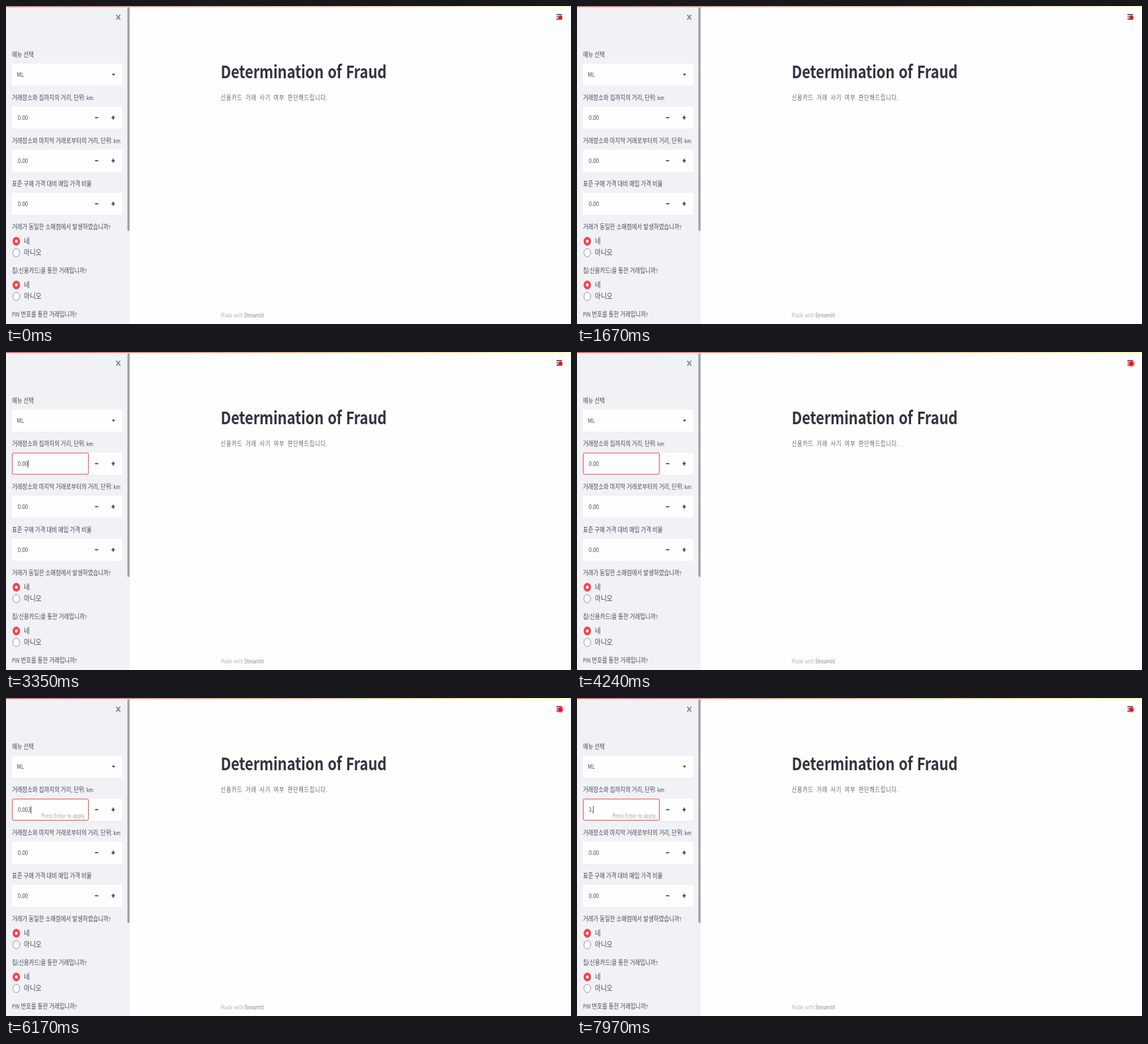
Recreate the animation shown at these times as an HTML page. Size 854 by 480 pixels, loop 8000 ms.

```html
<!DOCTYPE html>
<html lang="ko">
<head>
<meta charset="utf-8">
<title>Determination of Fraud</title>
<style>
  html, body { margin: 0; width: 100%; height: 100%; overflow: hidden; background: #fefefe; }
  svg { display: block; width: 854px; height: 480px; }
  text { font-family: "Noto Sans CJK KR", "Noto Sans KR", "Noto Sans CJK JP", "Noto Sans CJK", "Open Sans", sans-serif; fill: #4a4c58; white-space: pre; }
  .ko { font-size: 1.215em; }
  .title { font-weight: 700; fill: #31333f; letter-spacing: -.005em; }
  .mono { fill: #666872; letter-spacing: .08em; word-spacing: .196em; }
  .faint { fill: #b4b5ba; }
  .brand { fill: #85868d; font-weight: 500; }
  .hint { fill: #a3a4aa; text-anchor: end; }
  .box { fill: #fefefe; }
  .sign { stroke: #31333f; stroke-width: 1.5; fill: none; }
</style>
</head>
<body>
<svg id="stage" viewBox="0 0 854 480">
  <defs>
    <linearGradient id="bar">
      <stop offset="0" stop-color="#ff4b4b"/>
      <stop offset="1" stop-color="#fffd80"/>
    </linearGradient>
    <radialGradient id="glow">
      <stop offset=".3" stop-color="#f01020"/>
      <stop offset=".65" stop-color="#ff4a55" stop-opacity=".5"/>
      <stop offset="1" stop-color="#ff8088" stop-opacity="0"/>
    </radialGradient>
  </defs>
  <rect width="854" height="480" fill="#fefefe"/>
  <rect width="187" height="480" fill="#f0f2f6"/>
  <rect x="183.5" y="2" width="3.3" height="337.5" rx="1.5" fill="#a0a1a5"/>
  <rect width="854" height="1.4" fill="url(#bar)"/>
  <path d="M166.7 13.4l6 7.2m0-7.2l-6 7.2" stroke="#85878f" stroke-width="1.7"/>
  <g id="ui"></g>
  <path d="M160 102.3h5l-2.5 3z" fill="#31333f"/>

  <rect id="focus" x="9.5" y="152.5" width="115" height="32" rx="1.6" fill="none" stroke="#ff4b4b"/>
  <g id="hover">
    <path d="M124 152h25.3v33H124z" fill="#ff4b4b"/>
    <path d="M134.5 168.7h5" stroke="#fff" stroke-width="1.5"/>
    <path d="M136.2 171.2q1-1.2 1.8 0v4l2.7.8q1 .4.8 1.6l-.6 3.2-.8 1.4h-3.4l-2.6-3.8q.2-1.4 2.1.1z"
      fill="#fff" stroke="#33181c" stroke-width=".6"/>
  </g>
  <g id="typed"></g>
  <path id="caret" d="M0 163v11.6" stroke="#31333f" stroke-width=".8"/>

  <path d="M832 13h8.5m-8.5 3.4h8.5m-8.5 3.4h8.5" stroke="#31333f" stroke-width="1.4"/>
  <circle id="halo" cx="838" cy="17.4" fill="url(#glow)"/>
  <circle cx="838" cy="17.4" r="2.9" fill="#e8101c"/>
</svg>
<script>
const NS = "http://www.w3.org/2000/svg";
const $ = id => document.getElementById(id);
// The page is 1536 x 730, shown on the 854 x 480 stage.
const SX = 854 / 1536, SY = 480 / 730;
const LATIN = .895;

function add(parent, tag, attrs) {
  const el = document.createElementNS(NS, tag);
  for (const k in attrs) el.setAttribute(k, attrs[k]);
  return parent.appendChild(el);
}

function text(str, x, y, size, cls = "", parent = $("ui")) {
  const el = add(parent, "text", {
    class: cls, "font-size": size, transform: `translate(${x} ${y}) scale(${SX} ${SY})`
  });
  if (cls === "mono") el.textContent = str;
  else for (const part of str.split(/([가-힣]+)/)) {
    if (!part) continue;
    add(el, "tspan", /[가-힣]/.test(part) ? { class: "ko" } : {}).textContent = part;
  }
  return el;
}

const label = (str, y) => text(str, 9, y, 14 * LATIN);
const box = y => add($("ui"), "rect", { class: "box", x: 9, y, width: 167, height: 33, rx: 2 });

function numberInput(str, y, value) {
  label(str, y - 10.3);
  box(y);
  const c = y + 16.6;
  add($("ui"), "path", { class: "sign", d: `M134.5 ${c}h5M159.5 ${c}h5M162 ${c - 3}v6` });
  if (value) text(value, 17.8, y + 20.4, 16 * LATIN);
}

function radio(str, y, on) {
  const oval = (rx, ry, fill, stroke) =>
    add($("ui"), "ellipse", { cx: 15.6, cy: y, rx, ry, fill, stroke });
  if (on) {
    oval(5.6, 6.6, "#fa4048", "none");
    oval(2.1, 2.5, "#fefefe", "none");
  } else oval(5.2, 6.2, "#fefefe", "#96979d");
  text(str, 27, y + 3.8, 16 * LATIN);
}

function question(str, y) {
  label(str, y);
  radio("네", y + 18.3, true);
  radio("아니오", y + 35.6, false);
}

label("메뉴 선택", 76.5);
box(87);
text("ML", 16.3, 107.4, 16 * LATIN);
numberInput("거래장소와 집까지의 거리, 단위: km", 152);
numberInput("거래장소와 마지막 거래로부터의 거리, 단위: km", 217, "0.00");
numberInput("표준 구매 가격 대비 매입 가격 비율", 282, "0.00");
question("거래가 동일한 소매점에서 발생하였습니까?", 336.8);
question("칩(신용카드)을 통한 거래입니까?", 402.8);
label("PIN 번호를 통한 거래입니까?", 468.5);

text("Determination of Fraud", 324.5, 109, 44 * LATIN, "title");
text("신용카드 거래 사기 여부 판단해드립니다.", 324.5, 141.5, 14.9, "mono");
text("Made with ", 324.5, 470.3, 14 * LATIN, "faint");
text("Streamlit", 360, 470.3, 14 * LATIN, "brand");

const value = text("0.00", 17.8, 172.4, 16 * LATIN, "", $("typed"));
const hint = text("Press Enter to apply", 118.8, 181, 14 * LATIN, "hint", $("typed"));

const LOOP = 8000, BLINK = 530, BEAT = 2000;
// Time of each key press and the value after it; the first two only restart the caret.
const keys = [
  [0, "0.00"], [3340, "0.00"], [4400, "0.00"], [5700, "0.003"],
  [6550, "0.00"], [6750, "0.0"], [6900, "0."], [7050, "0"], [7200, ""],
  [7480, "3"], [7800, "3."]
];
const show = (el, on) => el.setAttribute("visibility", on ? "visible" : "hidden");

function draw(now) {
  const t = now % LOOP;
  const [since, str] = keys.filter(k => k[0] <= t).pop();
  if (value.textContent !== str) value.textContent = str;
  show($("focus"), t >= 2000);
  show($("hover"), t >= 2200 && t < 2760);
  show(hint, t >= 5700);
  show($("caret"), t >= 3340 && (t - since) % (2 * BLINK) < BLINK);
  const end = str ? value.getComputedTextLength() * SX : 0;
  $("caret").setAttribute("transform", `translate(${18 + end} 0)`);

  // The glow fades in, then breathes.
  const fade = Math.max(0, Math.min(1, (t - 270) / 300));
  const pulse = (1 + Math.cos(2 * Math.PI * (t - 400) / BEAT)) / 2;
  $("halo").setAttribute("r", 4.5 + 2.5 * pulse);
  $("halo").setAttribute("opacity", fade * (.55 + .4 * pulse));
  requestAnimationFrame(draw);
}
draw(performance.now());
</script>
</body>
</html>
```
